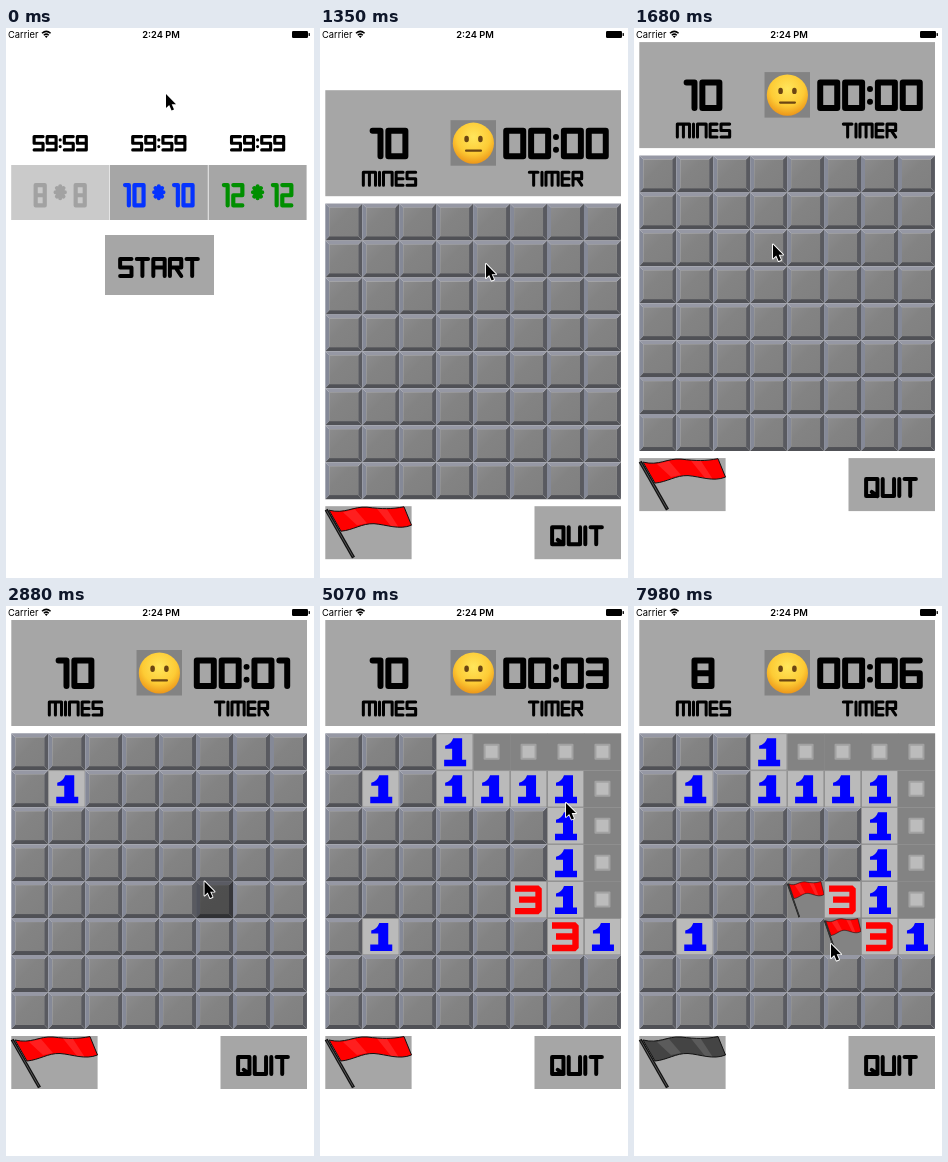
These frames come from a looping animation (308 px wide and 550 px high, 8000 ms). An HTML page:

```html
<!DOCTYPE html>
<html lang="en">
<head>
<meta charset="utf-8">
<title>Mine field</title>
<style>
  html, body { margin: 0; width: 100%; height: 100%; overflow: hidden; background: #fff; }
  svg { display: block; width: 100vw; height: 100vh; }
  .status { font-family: Inter, Roboto, sans-serif; font-size: 9.3px; }
  .word { fill: none; stroke-linecap: round; stroke-linejoin: round; }
</style>
</head>
<body>
<svg viewBox="0 0 308 550" xmlns="http://www.w3.org/2000/svg">
  <defs>
    <radialGradient id="skin" cx=".5" cy=".35" r=".68">
      <stop offset="0" stop-color="#ffe65c"/>
      <stop offset=".6" stop-color="#fdcb35"/>
      <stop offset="1" stop-color="#ea9016"/>
    </radialGradient>
    <linearGradient id="gloss" x2="1" y2="1">
      <stop offset="0" stop-color="#8c8c8d"/>
      <stop offset=".4" stop-color="#838383"/>
      <stop offset="1" stop-color="#808080"/>
    </linearGradient>
    <g id="closed">
      <path fill="#9698a4" d="M0 0H37L32.5 4.2H4.2Z"/>
      <path fill="#858997" d="M0 0L4.2 4.2V32.5L0 37Z"/>
      <path fill="#595a60" d="M37 0V37L32.8 32.5V4.2Z"/>
      <path fill="#505156" d="M0 37L4.2 32.5H32.8L37 37Z"/>
      <rect x="4" y="4" width="29" height="29" fill="url(#gloss)"/>
    </g>
    <g id="open">
      <rect width="37" height="37" fill="#868686"/>
      <rect x=".8" y=".8" width="35.6" height="35.6" fill="#bababa"/>
    </g>
    <g id="one">
      <use href="#open"/>
      <path fill="#00f" d="M17 5H26V26.5H30V33H8V26.5H16V15.5H9V12.5Q15 11 17 5Z"/>
    </g>
    <g id="three">
      <use href="#open"/>
      <path fill="none" stroke="#f00" stroke-width="6.4" stroke-linejoin="bevel" d="M5 7.5H28.5V30H5M9 18.5H28.5"/>
    </g>
    <g id="blank">
      <rect width="37.2" height="37.2" fill="#838383"/>
      <rect x="10.5" y="10.5" width="16" height="16" rx="1" fill="#a2a2a2"/>
      <rect x="12.5" y="12.5" width="12" height="12" fill="#bcbcbc"/>
    </g>
    <g id="banner">
      <path d="M4 4C20 8 28 0 42 1C58 3 66 3 79 .6L86.5 19C74 24 62 18.5 49 17.5C37 17 28 24 16 25Z" fill="currentColor" stroke="#111" stroke-width="1"/>
      <path d="M18 6L30 3L42 17L32 19ZM52 2.6L62 3L73 20L66 20Z" fill="#fff" opacity=".12"/>
      <path d="M1.2 3.5L28.5 51.5" stroke="#111" stroke-width="3.4"/>
      <path d="M1.6 4.5L28 50.5" stroke="#555" stroke-width="1"/>
    </g>
    <g id="flag">
      <rect width="37.2" height="37.2" fill="#838383"/>
      <use href="#banner" color="#f00" transform="scale(.428 .7)"/>
    </g>
  </defs>
  <g id="menu"></g>
  <g id="game">
    <rect width="308" height="550" fill="#fff"/>
    <g id="panel"></g>
    <g id="mines"></g>
    <g id="timer"></g>
    <g id="cells"></g>
    <use id="flagButton" href="#banner" x="5" y="430"/>
  </g>
  <g class="status">
    <text x="2" y="10.2">Carrier</text>
    <text x="155" y="10.2" text-anchor="middle" font-weight="600">2:24 PM</text>
    <g fill="none" stroke="#000" stroke-width="1.5">
      <path d="M36 5.3Q40.3 1.4 44.6 5.3M37.8 7.2Q40.3 5 42.8 7.2"/>
    </g>
    <path d="M38.8 8.3Q40.3 7.1 41.8 8.3L40.3 9.9Z"/>
    <rect x="286" y="3" width="16" height="7" rx="1.2"/>
    <rect x="302.6" y="5" width="1.3" height="3" rx=".6"/>
  </g>
  <path id="cursor" d="M0 0V14L3.2 11L5.6 16.6L8 15.6L5.7 10.2H10Z" stroke="#fff" stroke-width="1.8" paint-order="stroke" stroke-linejoin="round"/>
</svg>
<script>
const LOOP = 8000, STEP = 30, CELL = 36.95, GREY = '#a6a6a6';
const $ = id => document.getElementById(id);

// Polylines as xy pairs on a grid 2 wide and 4 high
const GLYPHS = {
  0: '0020240400', 1: '002024', 2: '002022020424', 3: '00202404 0222',
  4: '000222 2024', 5: '200002222404', 6: '200004242202',
  8: '0020240400 0222', 9: '220200202404', ':': '0101 0303',
  S: '200002222404', T: '0020 1014', A: '04002024 0222', R: '0400202202 1224',
  M: '04002024 1014', I: '0004', N: '04002024', E: '20000424 0222',
  Q: '0020240400 1324', U: '00042420'
};
const WIDTHS = { 1: .44, ':': .19, I: .19, M: .95, E: .62 };
const GAP = .06;

function word(text, cx, top, h, color = '#000', squash = 1) {
  const pen = h * (squash < 1 ? .17 : .19);
  const chars = [...text];
  const width = c => (WIDTHS[c] || .73) * h * squash;
  const total = chars.reduce((sum, c) => sum + width(c) + GAP * h, -GAP * h);
  let x = cx - total / 2, d = '';
  for (const c of chars) {
    const w = Math.max(0, width(c) - pen);
    for (const line of GLYPHS[c].split(' ')) {
      d += line.match(/../g).map(([gx, gy], i) =>
        (i ? 'L' : 'M') + (x + pen / 2 + w * gx / 2).toFixed(2) + ' ' +
        (top + pen / 2 + (h - pen) * gy / 4).toFixed(2)).join('');
    }
    x += width(c) + GAP * h;
  }
  return `<path class="word" role="img" aria-label="${text}" d="${d}" stroke="${color}" stroke-width="${pen}"/>`;
}

const rect = (x, y, w, h, fill = GREY) =>
  `<rect x="${x}" y="${y}" width="${w}" height="${h}" fill="${fill}"/>`;

function star(cx, cy, color) {
  let d = '';
  for (let i = 0; i < 4; i++) {
    const a = i * Math.PI / 4, x = 4.7 * Math.cos(a), y = 6 * Math.sin(a);
    d += `M${cx - x} ${cy - y}L${cx + x} ${cy + y}`;
  }
  return `<path class="word" d="${d}" stroke="${color}" stroke-width="4"/>`;
}

function sizeTile(x, n, spread, color, fill) {
  const cx = x + 49;
  return word('59:59', cx, 107, 16.5) + rect(x, 137, 98, 55, fill) +
    word(n, cx - spread, 155, 24.5, color, .74) + star(cx, 164.3, color) +
    word(n, cx + spread, 155, 24.5, color, .74);
}

$('menu').innerHTML =
  sizeTile(5.2, '8', 20, '#a2a2a2', '#cacaca') +
  sizeTile(103.8, '10', 24.5, '#0433ff', GREY) +
  sizeTile(202.6, '12', 24.5, '#008f00', GREY) +
  rect(99, 207, 109, 60) + word('START', 153, 229, 21);

$('panel').innerHTML =
  rect(5.3, 14, 295.7, 106) + rect(130.5, 44, 45.5, 45.5, '#838383') +
  `<circle cx="153.4" cy="67" r="20.6" fill="url(#skin)"/>
   <g fill="#6b4512"><ellipse cx="146.6" cy="62.8" rx="2.3" ry="3.2"/>
   <ellipse cx="160.4" cy="62.8" rx="2.3" ry="3.2"/>
   <rect x="145" y="73.3" width="17" height="2.3" rx="1.1"/></g>` +
  word('MINES', 69.5, 94.5, 16) + word('TIMER', 235.5, 94.5, 16) +
  rect(5.3, 430, 86.3, 53) + rect(214.5, 430, 86.5, 53) + word('QUIT', 257, 449, 21);

// press time, result time, column, row, result
const TAPS = [
  [2130, 2280, 1, 1, 'one'],
  [2880, 2970, 5, 4, 'three'],
  [3630, 3780, 1, 5, 'one'],
  [4440, 4560, 7, 1, 'blank'],
  [6660, 6750, 4, 4, 'flag'],
  [7470, 7560, 5, 5, 'flag']
];
const FLOOD = ['...1    ', '...1111 ', '......1 ', '......1 ', '......1 ', '......31'];
const FLOOD_AT = 4560, FLAG_MODE_AT = 5910;
const KINDS = { ' ': 'blank', 1: 'one', 3: 'three' };
const TICKS = [2130, 3180, 4200, 5220, 6210, 7230];

// start, end, x and y reached
const MOVES = [
  [0, 0, 160, 66], [300, 450, 168, 220], [570, 780, 166, 236],
  [1590, 1770, 112, 197], [1920, 2100, 56, 186], [2400, 2580, 198.5, 275.5],
  [3120, 3390, 62, 318], [3930, 4380, 264, 193], [4740, 4860, 249, 193],
  [5010, 5820, 56, 443], [5850, 6000, 56, 441], [6120, 6390, 165, 296],
  [6840, 7080, 197, 318], [7860, 7980, 197, 338]
];

function pointer(t) {
  let x = 0, y = 0;
  for (const [from, to, nx, ny] of MOVES) {
    if (t < from) break;
    const p = to > from ? Math.min(1, (t - from) / (to - from)) : 1;
    const e = p * p * (3 - 2 * p);
    x += (nx - x) * e;
    y += (ny - y) * e;
  }
  return [x, y];
}

// Critically damped spring
function slide(t) {
  const k = Math.max(0, t - 1155) * .0208;
  return 550 * (1 + k) * Math.exp(-k);
}

function kindAt(col, row, t) {
  const tap = TAPS.find(([, done, c, r]) => c === col && r === row && t >= done);
  if (tap) return tap[4];
  const mark = t >= FLOOD_AT && FLOOD[row] && FLOOD[row][col];
  return KINDS[mark] || 'closed';
}

function board(t) {
  let out = '';
  for (let row = 0; row < 8; row++) {
    for (let col = 0; col < 8; col++) {
      out += `<use href="#${kindAt(col, row, t)}" x="${5.3 + col * CELL}" y="${127.3 + row * CELL}"/>`;
    }
  }
  const held = TAPS.find(([press, done]) => t >= press && t < done);
  if (held) {
    out += `<rect x="${5.3 + held[2] * CELL}" y="${127.3 + held[3] * CELL}" width="37" height="37" opacity=".4"/>`;
  }
  return out;
}

const shown = {};
function put(id, html) {
  if (shown[id] !== html) $(id).innerHTML = shown[id] = html;
}

function draw(now) {
  const time = now % LOOP, t = time - time % STEP;
  const flags = TAPS.filter(tap => tap[4] === 'flag' && t >= tap[1]).length;
  const secs = TICKS.filter(at => t >= at).length;
  put('mines', word(String(10 - flags), 69, 51.5, 31.5));
  put('timer', word('00:0' + secs, 236, 51.5, 31.5));
  put('cells', board(t));
  $('flagButton').setAttribute('color', t >= FLAG_MODE_AT ? '#444' : '#f00');
  $('game').setAttribute('transform', `translate(0 ${slide(t).toFixed(1)})`);
  $('game').setAttribute('visibility', t < 1155 ? 'hidden' : 'visible');
  $('cursor').setAttribute('transform', `translate(${pointer(t)})`);
}

const start = performance.now();
function frame() {
  draw(performance.now() - start);
  requestAnimationFrame(frame);
}
frame();
</script>
</body>
</html>
```
